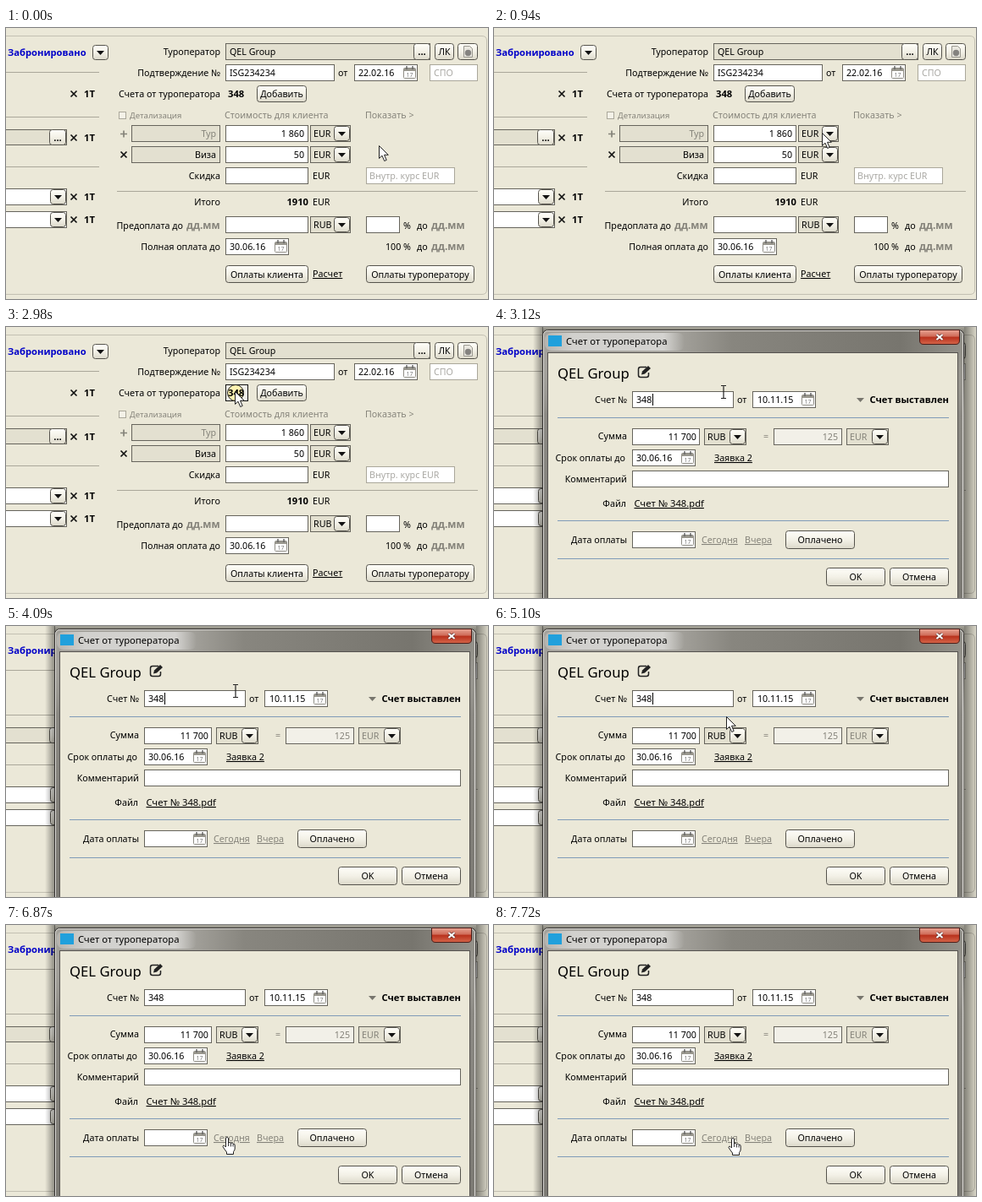
Animation, 569 px wide and 321 px high, one loop 8 s. Source, as an HTML page:

```html
<!DOCTYPE html>
<html lang="ru">
<head>
<meta charset="utf-8">
<title>Счет от туроператора</title>
<style>
html, body { margin: 0; width: 100%; height: 100%; overflow: hidden; background: #ebe8d8; }
svg { display: block; width: 569px; height: 321px; }
text { font: 10.7px "Noto Sans", "Open Sans", sans-serif; fill: #000; white-space: pre; }
.end { text-anchor: end; }
.mid { text-anchor: middle; }
.bold { font-weight: 700; font-size: 11.2px; }
.gray { fill: #85837a; }
.pale { fill: #aaa9a4; }
.blue { fill: #0000c8; }
.link { text-decoration: underline; }
.small { font-size: 9.6px; }
.date { font-size: 12px; font-weight: 600; fill: #85837a; }
.title { font-size: 11.2px; }
.head { font-size: 16.7px; }
</style>
</head>
<body>
<svg id="stage" viewBox="0 0 569 321"></svg>
<script>
const BG = '#ebe8d8', DIM = '#e3e0d0', SOFT = '#f2f0e8';

const text = (x, y, s, cls = '') => `<text x="${x}" y="${y}" class="${cls}">${s}</text>`;
const label = (y, s, x = 253) => text(x, y, s, 'end');
const path = (d, fill = 'none', stroke = 'none', w = 1) =>
  `<path d="${d}" fill="${fill}" stroke="${stroke}" stroke-width="${w}"/>`;
const rect = (x, y, w, h, fill, stroke = 'none', r = 0) =>
  `<rect x="${x}" y="${y}" width="${w}" height="${h}" rx="${r}" fill="${fill}" stroke="${stroke}"/>`;
const box = (x, y, w, h, fill = '#fff', stroke = '#66645c') =>
  rect(x + .5, y + .5, w - 1, h - 1, fill, stroke);
const rule = (x1, x2, y, c = '#aaa79a') => path(`M${x1} ${y + .5}H${x2}`, 'none', c);
const tri = (x, y, c = '#111') => path(`M${x - 4.5} ${y - 2}h9l-4.5 5z`, c);
const cross = (x, y) => path(`M${x - 3.5} ${y - 3.5}l7 7m0 -7l-7 7`, 'none', '#111', 1.7);

function button(x, y, w, h, s = '', cls = '') {
  return rect(x + .5, y + .5, w - 1, h - 1, 'url(#btn)', '#55534c', 3) +
    text(x + w / 2, y + h / 2 + 4, s, 'mid ' + cls);
}
function dropdown(x, y) {
  return button(x, y, 19, 18) + tri(x + 9.5, y + 9);
}
function select(x, y, w, s, cls) {
  return box(x, y, w, 20, DIM) + text(x + 4, y + 14, s, cls) + dropdown(x + w - 20, y + 1);
}
function calendar(x, y) {
  return rect(x + .5, y + 2.5, 14, 12, '#fff', '#8f8d85', 1) + rect(x + 1, y + 3, 13, 3, '#99978e') +
    path(`M${x + 4} ${y}v4M${x + 11} ${y}v4`, 'none', '#666', 1.5) +
    `<text x="${x + 7.5}" y="${y + 13}" text-anchor="middle" style="font-size:7px;fill:#777">17</text>`;
}
function dateField(x, y, s, pad = 5) {
  return box(x, y, 75, 20) + text(x + pad, y + 14, s) + calendar(x + 58, y + 2);
}

function page() {
  const rows = [78, 130, 200, 227].map(y => cross(80, y) + text(92, y + 4, '1T', 'bold')).join('');
  const lists = [190, 217].map(y => box(-2, y, 74, 20) + dropdown(52, y + 1)).join('');
  return rect(0, 0, 569, 321, BG) +
    path('M0 9.5H562Q567.5 9.5 567.5 15V310Q567.5 315.5 562 315.5H0', 'none', '#c3c0b2') +
    text(2, 33, 'Забронировано', 'bold blue') + dropdown(102, 20) +
    [52, 105, 164].map(y => rule(0, 110, y)).join('') +
    box(-2, 120, 74, 19, DIM) + button(51, 120, 20, 19, '...', 'bold') + lists + rows +

    label(32, 'Туроператор') + box(259, 18, 242, 20, DIM) + text(264, 32, 'QEL Group') +
    button(481, 18, 20, 20, '...', 'bold') + button(506, 18, 23, 20, 'ЛК') + button(533, 18, 24, 20) +
    path('M540.5 21.5h7l3 3v10h-10z', '#e9e7df', '#99978f') +
    '<circle cx="545.5" cy="29.5" r="3.7" fill="#858380"/>' +

    label(57, 'Подтверждение №') + box(259, 43, 129, 20) + text(264, 57, 'ISG234234') +
    text(392, 57, 'от') + dateField(411, 43, '22.02.16') +
    box(500, 43, 57, 20, '#fff', '#aaa79a') + text(505, 57, 'СПО', 'pale') +

    label(82, 'Счета от туроператора') +
    `<g id="hover">${box(259, 68, 27, 20, SOFT, '#111')}</g>` +
    '<circle id="ring" cx="271" cy="78" r="9.5" fill="#fff3b0" stroke="#222"/>' +
    text(262, 82, '348', 'bold') + button(296, 68, 59, 20, 'Добавить') +

    box(133, 99, 9, 9, '#f4f2e8', '#aaa79a') + text(146, 107, 'Детализация', 'gray small') +
    text(258, 107, 'Стоимость для клиента', 'gray') + text(424, 107, 'Показать &gt;', 'gray') +

    path('M135 125.5h8m-4 -4v8', 'none', '#85837a', 1.7) +
    box(148, 115, 105, 20, DIM) + text(248, 129, 'Тур', 'gray end') +
    box(259, 115, 98, 20) + label(129, '1 860', 352) + select(359, 115, 48, 'EUR') +
    cross(139, 150) + box(148, 140, 105, 20, DIM) + label(154, 'Виза', 248) +
    box(259, 140, 98, 20) + label(154, '50', 352) + select(359, 140, 48, 'EUR') +

    label(179, 'Скидка') + box(259, 165, 98, 20) + text(362, 179, 'EUR') +
    box(425, 165, 105, 20, '#fff', '#aaa79a') + text(429, 179, 'Внутр. курс EUR', 'pale') +
    rule(131, 557, 193) +
    label(210, 'Итого') + text(357, 210, '1910', 'bold end') + text(362, 210, 'EUR') +

    label(238, 'Предоплата до', 209) + text(213, 238, 'дд.мм', 'date') +
    box(259, 223, 98, 20) + select(359, 223, 48, 'RUB') + box(425, 223, 40, 20) +
    text(469, 238, '%') + text(485, 238, 'до') + text(502, 238, 'дд.мм', 'date') +
    label(263, 'Полная оплата до') + dateField(259, 249, '30.06.16') +
    text(448, 263, '100 %') + text(485, 263, 'до') + text(502, 263, 'дд.мм', 'date') +
    button(259, 281, 98, 21, 'Оплаты клиента') + text(362, 295, 'Расчет', 'link') +
    button(425, 281, 128, 21, 'Оплаты туроператору');
}

function dialog() {
  const line = y => rule(75, 537, y, '#7f9bb8');
  return rect(46, 0, 12, 321, 'url(#shadeL)') + rect(555, 0, 14, 321, 'url(#shadeR)') +
    rect(57, 0, 498, 8, 'url(#shadeT)') +
    rect(57.5, 3.5, 497, 330, 'url(#glass)', '#33312f', 6) +
    rect(58, 31, 497, 290, 'url(#sides)') +
    rect(58.5, 4.5, 495, 328, 'none', '#dcdad6', 5) +
    rect(60, 7, 165, 21, 'url(#glow)', 'none', 8) +
    rect(64, 10, 16, 13, '#20a0dc') + text(85, 21, 'Счет от туроператора', 'title') +
    path('M502.5 3.5V16Q502.5 20.5 507 20.5H545Q549.5 20.5 549.5 16V3.5z', 'url(#close)', '#4b1c18') +
    path('M522.5 9l7 6m0 -6l-7 6', 'none', '#5b2723', 3.6) +
    path('M522.5 9l7 6m0 -6l-7 6', 'none', '#fff', 2.2) +
    rect(63.5, 30.5, 484, 300, BG, '#55524f') +

    text(75, 61, 'QEL Group', 'head') +
    path('M180 47.5h-7q-2.5 0 -2.5 2.5v7q0 2.5 2.5 2.5h7q2.5 0 2.5 -2.5v-3', 'none', '#222', 1.5) +
    path('M174 56.5l1 -4l7 -6.5l3 3l-7 6.5z', '#222') +

    label(90, 'Счет №', 157) + box(163, 76, 120, 20) + text(168, 90, '348') +
    `<g id="caret">${rect(187, 79, 1, 14, '#000')}</g>` +
    text(287, 90, 'от') + dateField(305, 76, '10.11.15', 6) +
    tri(432.5, 86, '#77756d') + text(537, 90, 'Счет выставлен', 'bold end') + line(107) +

    label(133, 'Сумма', 157) + box(163, 120, 80, 20) + label(134, '11 700', 239) +
    select(248, 120, 50, 'RUB') + text(318, 133, '=', 'gray') +
    box(330, 120, 81, 20, SOFT) + text(406, 134, '125', 'gray end') +
    select(416, 120, 50, 'EUR', 'gray') +
    label(159, 'Срок оплаты до', 155) + dateField(163, 145, '30.06.16') +
    text(260, 159, 'Заявка 2', 'link') +
    label(184, 'Комментарий', 157) + box(163, 170, 374, 20) +
    label(213, 'Файл', 156) + text(165.5, 213, 'Счет № 348.pdf', 'link title') + line(229) +

    label(256, 'Дата оплаты', 157) + dateField(163, 242, '') +
    text(245, 256, 'Сегодня', 'gray link') + text(296, 256, 'Вчера', 'gray link') +
    button(344, 241, 82, 22, 'Оплачено') + line(274) +
    button(392, 285, 70, 22, 'OK') + button(467, 285, 70, 22, 'Отмена');
}

const gradient = (id, dir, ...stops) => `<linearGradient id="${id}" ${dir}>` +
  stops.map(([at, c, o = 1]) => `<stop offset="${at}" stop-color="${c}" stop-opacity="${o}"/>`).join('') +
  '</linearGradient>';
const DOWN = 'x2="0" y2="1"';

const pointers = {
  arrow: path('M.5 .5V15.5L4 12.2L6.7 18.5L9.2 17.4L6.5 11.3H11.3z', '#fff', '#222'),
  beam: path('M-3 -7.5h2.5l.5 .5l.5 -.5h2.5M0 -7V7M-3 7.5h2.5l.5 -.5l.5 .5h2.5', 'none', '#222', 1.2),
  hand: path('M-1.5 12V1.5Q0 -.8 1.5 1.5V7Q3 5.5 4.3 7.5Q6 6.3 7 8.3Q9.2 7.5 9.2 10V14Q9 16 7.5 17.5V20.5H-.5V18Q-3 15 -5 11.5Q-4.5 8.5 -1.5 12z', '#fff', '#222') +
    path('M1.5 7v4M4.4 8v3.5M7 8.5v3', 'none', '#222', .9)
};

const $ = id => document.getElementById(id);
$('stage').innerHTML = '<defs>' +
  gradient('btn', DOWN, [0, '#fffef9'], [.5, '#f3f1e7'], [1, '#dcd9ca']) +
  gradient('close', DOWN, [0, '#e8a493'], [.45, '#cf6b58'], [.5, '#b8301c'], [1, '#d5664a']) +
  gradient('glass', '', [0, '#a3a19b'], [.3, '#a8a6a0'], [.45, '#88867f'], [.85, '#77756e'], [1, '#94928b']) +
  gradient('glow', '', [0, '#fff', .2], [.2, '#fff', .5], [.85, '#fff', .5], [1, '#fff', 0]) +
  gradient('sides', DOWN, [0, '#aaa8a2', 0], [.25, '#8b8983'], [1, '#7b7973']) +
  gradient('shadeL', '', [0, '#000', 0], [1, '#000', .42]) +
  gradient('shadeR', '', [0, '#000', .45], [1, '#000', .08]) +
  gradient('shadeT', DOWN, [0, '#000', .3], [1, '#000', .5]) + '</defs>' +
  page() + `<g id="dialog">${dialog()}</g>` +
  Object.entries(pointers).map(([id, d]) => `<g id="${id}">${d}</g>`).join('');

// Pointer moves: first step, last step (ms), number of steps, end x, end y
const moves = [
  [500, 1460, 8, 334, 109],
  [1610, 1610, 1, 324, 106],
  [1750, 2160, 4, 270, 76],
  [3120, 3120, 1, 271, 77],
  [4650, 5100, 4, 274, 107],
  [5240, 5630, 4, 279, 168],
  [5790, 6060, 3, 282, 226],
  [6210, 6740, 5, 262, 250],
  [6870, 7030, 2, 260, 251],
  [7300, 7720, 4, 282, 252]
];
const blinks = [3660, 4090, 4650, 5100, 5630, 6060, 6600, 7030, 7580];

function pointerAt(t) {
  let x = 440, y = 139;
  for (const [start, end, n, tx, ty] of moves) {
    if (t < start) break;
    const gap = (end - start) / (n - 1) || 1;
    const p = Math.min(n, Math.floor((t - start) / gap + 1e-6) + 1) / n;
    x += (tx - x) * p;
    y += (ty - y) * p;
  }
  return [Math.round(x), Math.round(y)];
}

const show = (id, on) => $(id).setAttribute('visibility', on ? 'visible' : 'hidden');

function draw(now) {
  const t = now % 8000, open = t >= 3120;
  const [x, y] = pointerAt(t);
  const kind = open && y < 96 ? 'beam' : open && y > 243 ? 'hand' : 'arrow';
  $('dialog').style.display = open ? '' : 'none';
  show('hover', t >= 2160 && !open);
  show('ring', t >= 2980 && !open);
  show('caret', blinks.filter(b => t >= b).length % 2 === 0);
  for (const id in pointers) show(id, id === kind);
  $(kind).setAttribute('transform', `translate(${x} ${y})`);
  requestAnimationFrame(draw);
}
requestAnimationFrame(draw);
</script>
</body>
</html>
```
